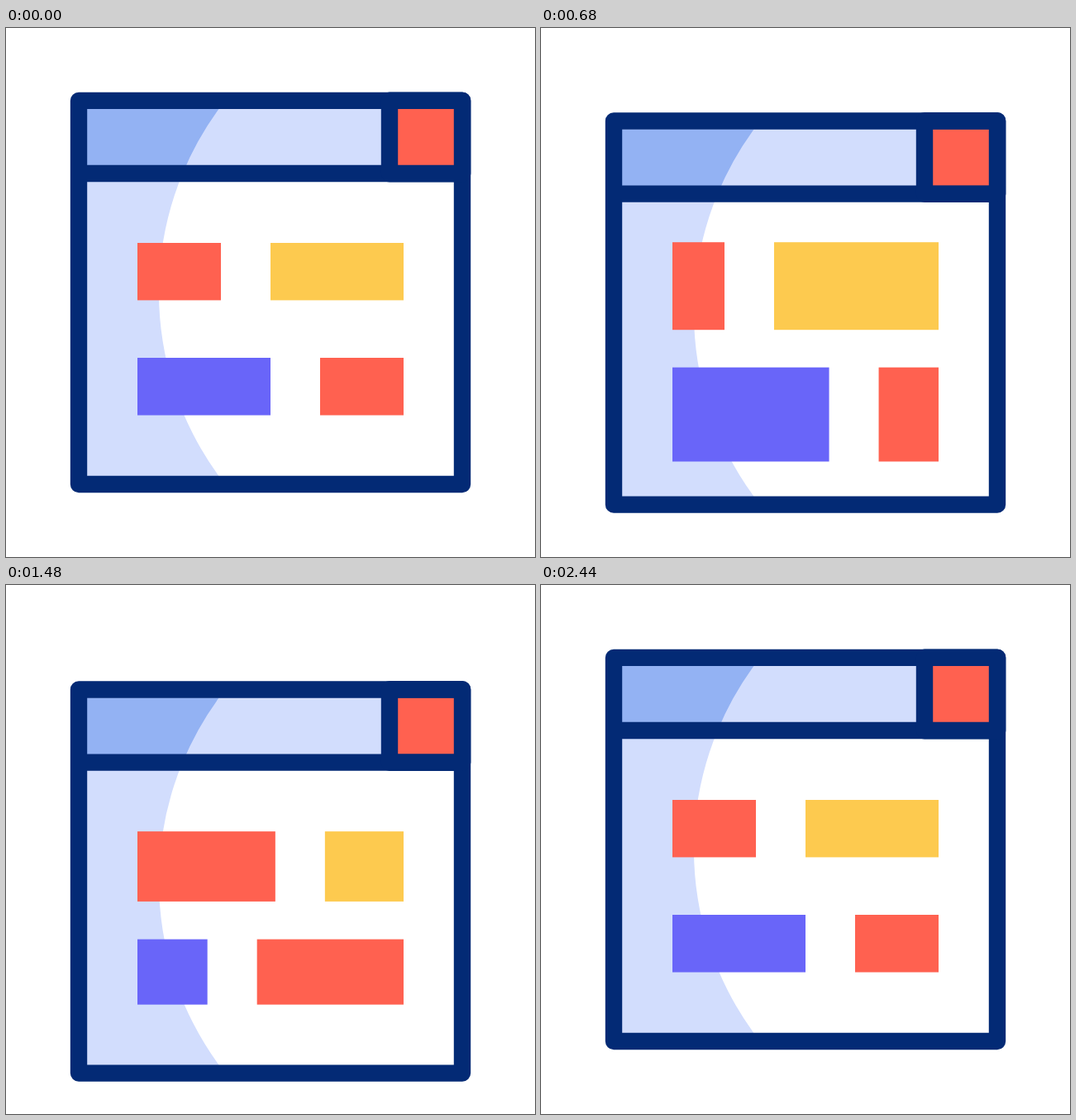
Animation of 640 by 640 pixels, one loop 2520 ms. Source, as an HTML page:

```html
<!DOCTYPE html>
<html lang="en">
<head>
<meta charset="utf-8">
<title>Window layout</title>
<style>
  html, body { margin: 0; width: 100%; height: 100%; overflow: hidden; background: #fff; }
  svg { display: block; width: 100%; height: 100%; }
  .line { fill: none; stroke: #032a75; stroke-width: 20.4; stroke-linejoin: round; }
  .light { fill: #d2ddfd; }
  .mid { fill: #93b2f3; }
  .red { fill: #ff6150; }
  .yellow { fill: #fdca4f; }
  .purple { fill: #6965f9; }
</style>
</head>
<body>
<svg viewBox="0 0 640 640">
  <g id="win">
    <path class="light" d="M88 88H257.5V98A376 376 0 0 0 257.5 542V552H88Z"/>
    <path class="light" d="M88 88H464V176H88Z"/>
    <path class="mid" d="M88 98H257.5A376 376 0 0 0 213.7 176H88Z"/>
    <path class="red" d="M464 88H552V176H464Z"/>
    <path class="line" d="M88 87.9H552V552H88ZM88 176H552"/>
    <path class="line" d="M464 87.6H552.2V176.2H464Z"/>
    <rect class="red"/>
    <rect class="yellow"/>
    <rect class="purple"/>
    <rect class="red"/>
  </g>
</svg>
<script>
const LOOP = 2520, STEP = 40;
const LEFT = 159, RIGHT = 481, GAP = 60;

const win = document.getElementById('win');
const blocks = win.querySelectorAll('rect');

// Each key: [time, values, strength of the ease towards the next key]
const bob = [
  [65, [0], .64],
  [1212, [41.2], .64],
  [2345, [0]]
];

// Values per row: split x, top, bottom
const rest = [260, 260, 329.4, 320, 399, 468.5];
const rows = [
  [70, rest, .6],
  [726, [221.8, 234.4, 340.6, 348.7, 385.9, 500], .6],
  [1590, [327.7, 260, 344.4, 241.8, 390.1, 468.5], .667],
  [2435, rest]
];

// Progress along cubic-bezier(k, 0, 1 - k, 1)
function ease(u, k) {
  let lo = 0, hi = 1;
  for (let i = 0; i < 24; i++) {
    const s = (lo + hi) / 2, r = 1 - s;
    const x = 3 * r * r * s * k + 3 * r * s * s * (1 - k) + s * s * s;
    if (x < u) lo = s; else hi = s;
  }
  return lo * lo * (3 - 2 * lo);
}

function sample(keys, t) {
  if (t <= keys[0][0]) return keys[0][1];
  for (let i = 1; i < keys.length; i++) {
    const [start, from, k] = keys[i - 1], [end, to] = keys[i];
    if (t < end) {
      const p = ease((t - start) / (end - start), k);
      return from.map((v, j) => v + (to[j] - v) * p);
    }
  }
  return keys[keys.length - 1][1];
}

function place(el, x1, x2, top, bottom) {
  el.setAttribute('x', x1);
  el.setAttribute('y', top);
  el.setAttribute('width', x2 - x1);
  el.setAttribute('height', bottom - top);
}

function draw(t) {
  win.setAttribute('transform', `translate(0 ${sample(bob, t)[0]})`);
  const v = sample(rows, t);
  for (let row = 0; row < 2; row++) {
    const [split, top, bottom] = v.slice(row * 3, row * 3 + 3);
    place(blocks[row * 2], LEFT, split, top, bottom);
    place(blocks[row * 2 + 1], split + GAP, RIGHT, top, bottom);
  }
}

const begin = performance.now();
function tick() {
  const t = (performance.now() - begin) % LOOP;
  draw(t - t % STEP);
  requestAnimationFrame(tick);
}
tick();
</script>
</body>
</html>
```
